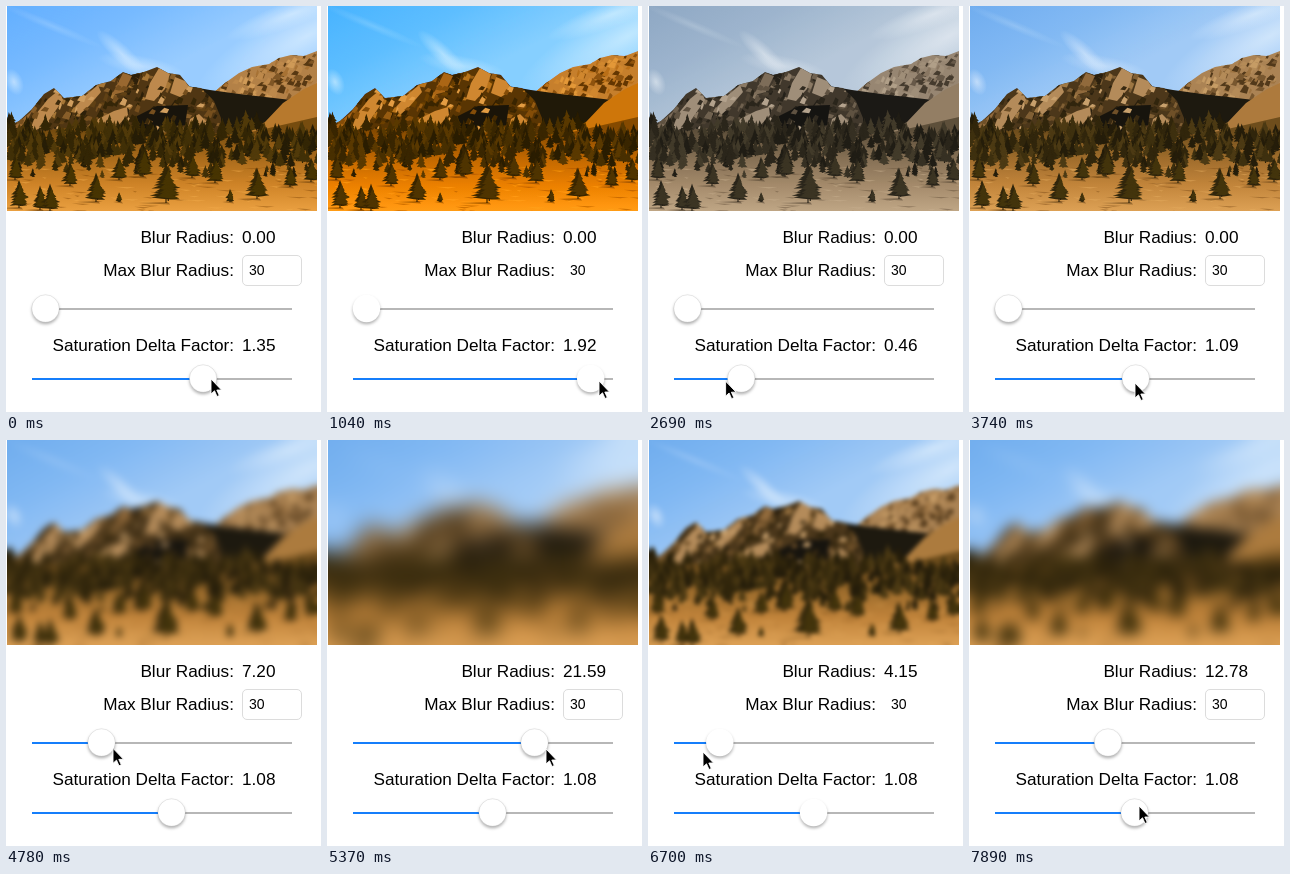
These frames come from a looping animation (315 px wide and 406 px high, 8000 ms). An HTML page with a canvas:

```html
<!DOCTYPE html>
<html lang="en">
<head>
<meta charset="utf-8">
<title>Blur and saturation</title>
<style>
html, body { margin: 0; width: 100%; height: 100%; overflow: hidden; background: #fff; }
#photo { position: absolute; left: 1px; top: 0; width: 310px; height: 205px; overflow: hidden; }
canvas { position: absolute; left: -60px; top: -60px; }
svg { position: absolute; left: 0; top: 0; }
text { font: 17.2px "Liberation Sans", Arial, sans-serif; }
.label { text-anchor: end; }
.track { stroke: #b7b7b7; stroke-width: 2; }
.fill { stroke: #157efb; stroke-width: 2; }
.thumb { fill: #fff; stroke: rgba(0,0,0,.16); stroke-width: .6; filter: drop-shadow(0 2.5px 1.8px rgba(0,0,0,.3)); }
.field { fill: #fff; stroke: #dcdcdc; }
.pale .field, .pale .thumb { stroke: none; }
</style>
</head>
<body>
<div id="photo"><canvas id="scene" width="430" height="325"></canvas></div>
<svg id="ui" width="315" height="406">
  <text class="label" x="228" y="237">Blur Radius:</text>
  <text id="blurText" x="236" y="237"></text>
  <text class="label" x="228" y="270">Max Blur Radius:</text>
  <rect class="field" x="236.5" y="249.5" width="59" height="30" rx="4.5"/>
  <text x="243" y="269" style="font-size:14px">30</text>
  <text class="label" x="228" y="345">Saturation Delta Factor:</text>
  <text id="satText" x="236" y="345"></text>
  <g id="blurSlider" transform="translate(0 303)">
    <path class="track" d="M26 0H286"/><path class="fill"/><circle class="thumb" cy="-.5" r="13.7"/>
  </g>
  <g id="satSlider" transform="translate(0 373)">
    <path class="track" d="M26 0H286"/><path class="fill"/><circle class="thumb" cy="-.5" r="13.7"/>
  </g>
  <path id="cursor" d="M0 0V15L3.5 11.8L6 17.5L8.3 16.5L5.8 11H10.5Z" stroke="#fff" stroke-width=".9"/>
</svg>
<script>
const $ = id => document.getElementById(id);
const W = 310, H = 205, PAD = 60;

let seed = 11;
const rnd = (a = 0, b = 1) => {
  seed = (seed * 16807) % 2147483647;
  return a + (b - a) * seed / 2147483647;
};
const pick = list => list[Math.floor(rnd(0, list.length))];

const g = $('scene').getContext('2d');

function poly(color, ...p) {
  g.beginPath();
  for (let i = 0; i < p.length; i += 2) g.lineTo(p[i], p[i + 1]);
  g.closePath();
  g.fillStyle = color;
  g.fill();
}

function shade(x0, y0, x1, y1, ...colors) {
  const grad = g.createLinearGradient(x0, y0, x1, y1);
  colors.forEach((c, i) => grad.addColorStop(i / (colors.length - 1), c));
  return grad;
}

function cloud(x, y, rx, ry, angle, alpha) {
  g.save();
  g.translate(x, y);
  g.rotate(angle);
  g.scale(rx, ry);
  const grad = g.createRadialGradient(0, 0, 0, 0, 0, 1);
  grad.addColorStop(0, `rgba(232,243,253,${alpha})`);
  grad.addColorStop(1, 'rgba(232,243,253,0)');
  g.fillStyle = grad;
  g.fillRect(-1, -1, 2, 2);
  g.restore();
}

// Slanted facets scattered over the current clip
function facets(n, x0, x1, y0, y1, colors) {
  for (let i = 0; i < n; i++) {
    const x = rnd(x0, x1), y = rnd(y0, y1), h = rnd(3, 9), w = rnd(1.5, 5);
    poly(pick(colors), x, y, x + w, y + h * .3, x + w - 2, y + h, x - w, y + h * .8);
  }
}

function pine(x, base, h, color) {
  const rows = Math.max(4, Math.round(h / 3));
  poly('#2b200c', x - .6, base, x, base - h, x + .6, base);
  for (let i = 0; i < rows; i++) {
    const y = base - h + h * .88 * (i + 1) / rows;
    const w = h * .4 * Math.min(1, (i + 1.2) / rows * 1.25);
    poly(color, x, y - h / rows * 1.7, x + w * rnd(.7, 1.1), y + rnd(-1, 1),
      x + w * .3, y + 1, x - w * .3, y + .4, x - w * rnd(.7, 1.1), y + rnd(-1, 1));
  }
}

function drawScene() {
  g.translate(PAD, PAD);
  g.beginPath();
  g.rect(0, 0, W, H);
  g.clip();

  g.fillStyle = shade(0, 0, 60, 115, '#74ace9', '#86b8ee', '#a4caf2');
  g.fillRect(0, 0, W, H);
  cloud(300, 30, 125, 34, -.5, .65);
  cloud(285, 8, 70, 13, -.35, .6);
  cloud(115, 48, 34, 9, .75, .55);
  cloud(135, 60, 45, 10, .2, .45);
  cloud(7, 76, 9, 14, -.4, .6);
  cloud(45, 20, 55, 5, .4, .2);

  // far ridge
  g.save();
  poly('#a88358', 195, 125, 205, 88, 218, 77, 232, 67, 245, 61, 262, 58, 272, 52,
    284, 49, 297, 50, 310, 45, 310, 130);
  g.clip();
  facets(230, 205, 310, 45, 118, ['#c39c6a', '#b18b5d', '#765733', '#50391d', '#9b7446']);
  g.restore();
  poly('#1d1910', 180, 80, 203, 84, 232, 88, 258, 91, 284, 94, 268, 110, 246, 124, 205, 128);
  poly('#a97b43', 236, 130, 258, 116, 276, 97, 297, 83, 310, 77, 310, 130);

  // near ridge
  g.save();
  poly('#4a371d', 0, 121, 12, 115, 25, 103, 37, 88, 47, 82, 57, 92, 75, 90, 89, 79, 104, 75,
    116, 66, 124, 69, 137, 66, 150, 61, 161, 67, 173, 69, 183, 81, 194, 82, 207, 95,
    214, 112, 214, 150, 0, 150);
  g.clip();
  facets(260, 0, 212, 62, 130, ['#2a2010', '#7e5f38', '#594221', '#30250f', '#9b7748']);
  const rock = '#b18b5e', dim = '#8e6a40';
  poly(rock, 22, 127, 29, 108, 41, 93, 52, 84, 56, 94, 47, 107, 38, 120);
  poly(dim, 2, 125, 13, 115, 25, 105, 18, 119);
  poly(rock, 68, 101, 79, 89, 91, 79, 94, 86, 82, 100, 72, 109);
  poly(rock, 77, 122, 91, 113, 107, 105, 120, 101, 121, 109, 106, 125);
  poly(dim, 105, 89, 116, 67, 125, 70, 117, 86);
  poly(rock, 138, 93, 143, 77, 152, 62, 163, 68, 158, 83, 147, 95);
  poly(rock, 163, 87, 168, 71, 178, 75, 184, 84, 173, 91);
  poly('#17140e', 128, 111, 150, 100, 181, 99, 178, 119, 150, 126, 132, 124);
  poly(rock, 180, 127, 183, 113, 192, 108, 206, 122, 208, 130);
  facets(90, 10, 210, 78, 125, ['#c5a071', '#6d502c', '#382a14']);
  g.restore();

  // meadow and forest
  poly(shade(0, 125, 0, H, '#6c4d20', '#9a6c31', '#bd8541', '#d9a25c'),
    0, 130, 60, 122, 125, 125, 180, 128, 240, 127, 310, 111, 310, H, 0, H);
  for (let i = 0; i < 120; i++) {
    const x = rnd(0, W), y = rnd(160, H), w = rnd(4, 22);
    poly(pick(['rgba(112,72,25,.45)', 'rgba(226,174,102,.5)']), x, y, x + w, y + .6, x + w * .6, y + 1.7);
  }
  const greens = ['#30260e', '#3d3012', '#4b3a17', '#241d0c'];
  for (let i = 0; i < 430; i++) {
    const y = 124 + 36 * i / 430, x = rnd(-4, W + 4);
    if (x > 258 && y < 131 || y > 152 && rnd() < .4) continue;
    pine(x, y + rnd(-2, 5), rnd(9, 17), pick(greens));
  }
  for (let i = 0; i < 30; i++) pine(rnd(0, W), rnd(161, 172), rnd(5, 11), pick(greens));
  [[8, 174, 22], [63, 180, 22], [112, 174, 21], [136, 171, 27], [185, 172, 23], [208, 177, 23],
   [283, 181, 19], [304, 176, 22], [89, 196, 27], [159, 197, 38], [250, 193, 29],
   [12, 202, 26], [33, 204, 22], [43, 205, 25], [223, 196, 11], [112, 196, 8]]
    .forEach(([x, y, h]) => {
      poly('rgba(83,55,20,.5)', x - h * .7, y, x + 2, y - 1, x + 4, y + 1.5);
      pine(x, y, h, greens[0]);
      pine(x + h * .06, y - 2, h * .78, '#42340f');
    });
}

// Repeat the border pixels outward so that blurring keeps solid edges
function extendEdges() {
  const c = $('scene');
  g.drawImage(c, PAD, PAD, 1, H, 0, PAD, PAD, H);
  g.drawImage(c, PAD + W - 1, PAD, 1, H, PAD + W, PAD, PAD, H);
  g.drawImage(c, 0, PAD, c.width, 1, 0, 0, c.width, PAD);
  g.drawImage(c, 0, PAD + H - 1, c.width, 1, 0, PAD + H, c.width, PAD);
}

g.save();
drawScene();
g.restore();
extendEdges();

// Keys are [step, value]; one step lasts STEP ms
const LOOP = 8000, STEP = 149;
const sat = [[0, 1.35], [4, 2], [6, 2], [7, 1.92], [12, .32], [13, .02], [14, 0], [16, 0],
  [21, 1.15], [24, 1.15], [25, 1.09], [26, 1.08]];
const blur = [[30, 0], [36, 21.59], [38, 30], [39, 30], [45, 4.15], [47, .8], [48, .8], [51, 12.78]];
const cursorX = [[0, 205], [4, 282], [6, 282], [7, 272], [12, 65], [13, 20], [14, 10], [15, 14], [16, 14],
  [21, 173], [24, 173], [25, 166], [26, 165], [27, 165], [28, 130], [29, 65], [30, 51], [36, 219],
  [38, 284], [39, 256], [45, 55], [47, 29], [48, 29], [51, 122], [52, 148], [53, 170]];
const cursorY = [[0, 373], [4, 374], [7, 375], [12, 374], [16, 374], [21, 377], [27, 377], [28, 350],
  [29, 318], [30, 308], [36, 309], [45, 312], [51, 311], [52, 335], [53, 366]];

function at(keys, k) {
  const i = keys.findIndex(key => key[0] > k);
  if (i < 0) return keys[keys.length - 1][1];
  if (i === 0) return keys[0][1];
  const [k0, v0] = keys[i - 1], [k1, v1] = keys[i];
  return v0 + (v1 - v0) * (k - k0) / (k1 - k0);
}

function setSlider(id, part) {
  const x = 39.5 + 233.5 * part;
  $(id).querySelector('.fill').setAttribute('d', `M26 0H${x}`);
  $(id).querySelector('.thumb').setAttribute('cx', x);
}

let shown = -1;
const start = performance.now();

function frame() {
  const t = (performance.now() - start) % LOOP;
  const k = Math.floor((t + 8) / STEP);
  if (k !== shown) {
    shown = k;
    const s = at(sat, k), b = at(blur, k);
    $('scene').style.filter = `saturate(${s}) blur(${b * .5}px)`;
    $('satText').textContent = s.toFixed(2);
    $('blurText').textContent = b.toFixed(2);
    setSlider('satSlider', s / 2);
    setSlider('blurSlider', b / 30);
    $('cursor').setAttribute('transform', `translate(${at(cursorX, k)} ${at(cursorY, k)})`);
    $('ui').classList.toggle('pale', [7, 8, 45, 46].includes(k));
  }
  requestAnimationFrame(frame);
}
frame();
</script>
</body>
</html>
```
